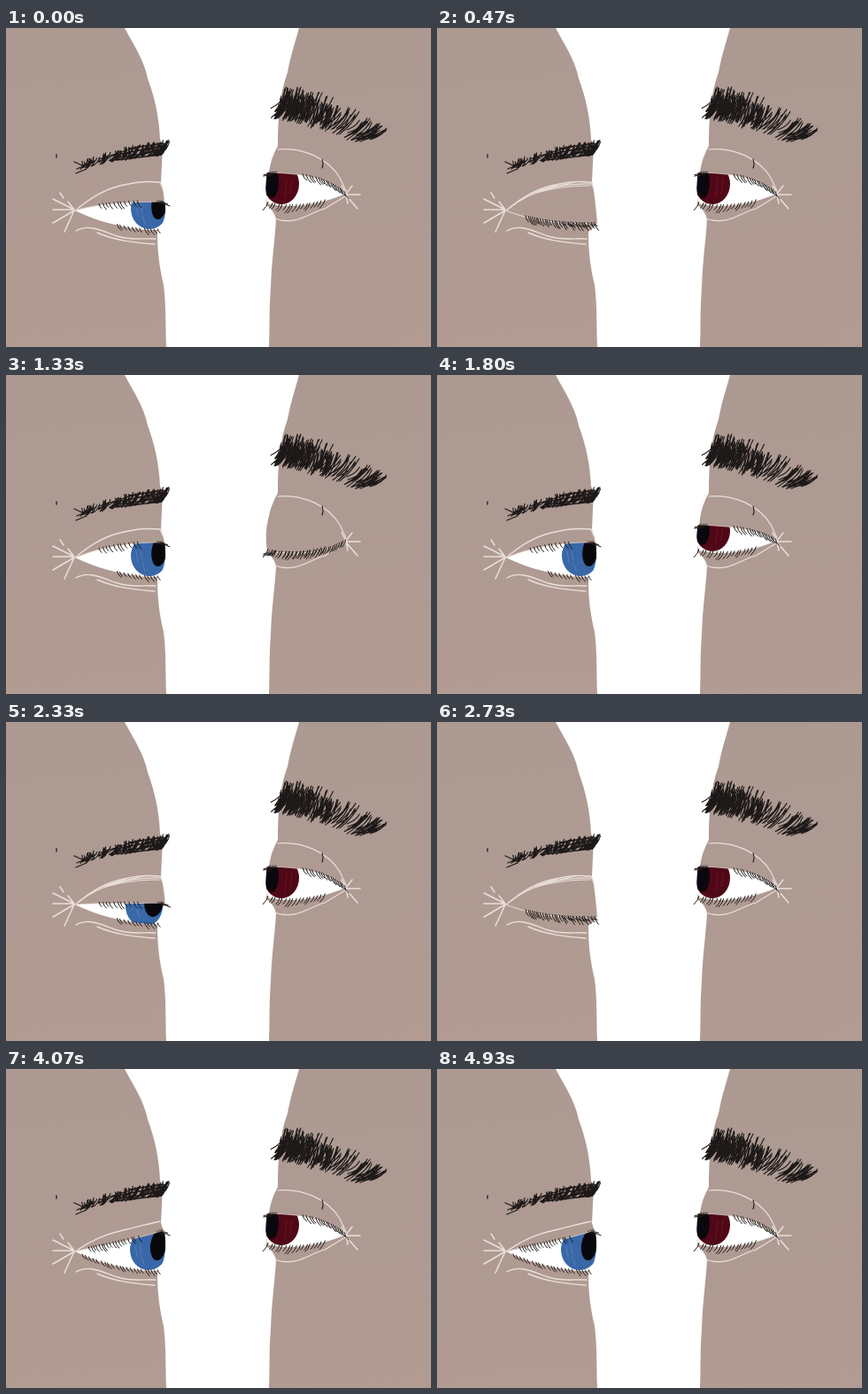
Animation of 480x360 px, one loop 5.39 s. Source, as an HTML page with a canvas:

```html
<!DOCTYPE html>
<html lang="en">
<head>
<meta charset="utf-8">
<title>Two eyes</title>
<style>
html, body { margin: 0; width: 100%; height: 100%; overflow: hidden; background: #fff; }
canvas { display: block; width: 480px; height: 360px; }
</style>
</head>
<body>
<canvas id="stage" width="480" height="360"></canvas>
<script>
const ctx = document.getElementById('stage').getContext('2d');
const LOOP = 5390, STEP = 1000 / 15;
const INK = '#1d1918', LINE = '#eadfd9';

// time, then heights of the two lid handles and the lid end
const leftLid = [
  [0, 199, 196, 196], [133, 207, 211, 209], [267, 215, 222, 221], [733, 215, 222, 221],
  [933, 204, 204, 204], [1200, 197, 188, 189], [2200, 197, 188, 189],
  [2333, 204, 205, 204], [2467, 215, 222, 221], [2800, 215, 222, 221],
  [3000, 204, 198, 197], [3267, 201, 194, 186], [3733, 200, 196, 182]
];
const rightLid = [
  [0, 172, 164, 163], [1000, 172, 164, 163], [1200, 197, 205, 199],
  [1467, 197, 205, 199], [1867, 172, 164, 163]
];
// time, then iris shift
const gaze = [[0, 1, 0], [1200, 1, 0], [2200, 1, 0], [2333, -5, 4], [2800, -3, 2], [3000, 1, 0], [3267, 0, 0]];

function sample(keys, time) {
  const next = keys.findIndex(k => k[0] > time);
  if (next < 0) return keys[keys.length - 1].slice(1);
  const a = keys[next - 1], b = keys[next];
  const u = (time - a[0]) / (b[0] - a[0]);
  return a.slice(1).map((v, i) => v + (b[i + 1] - v) * u);
}

function random(seed) {
  return () => (seed = (seed * 16807) % 2147483647) / 2147483647;
}

function stroke(path, color, width) {
  ctx.strokeStyle = color;
  ctx.lineWidth = width;
  ctx.stroke(new Path2D(path));
}

function fill(path, color) {
  ctx.fillStyle = color;
  ctx.fill(new Path2D(path));
}

function ellipse(x, y, rx, ry, color, tilt = 0) {
  ctx.beginPath();
  ctx.ellipse(x, y, rx, ry, tilt, 0, 7);
  ctx.fillStyle = color;
  ctx.fill();
}

function bezier(p, t) {
  const s = 1 - t;
  return [0, 1].map(i => s * s * s * p[i] + 3 * s * s * t * p[i + 2] + 3 * s * t * t * p[i + 4] + t * t * t * p[i + 6]);
}

const curve = p => `C${p.slice(2).join(' ')}`;

function lashes(p, from, to, count, dx, dy, seed) {
  const rnd = random(seed);
  let path = '';
  for (let i = 0; i < count; i++) {
    const [x, y] = bezier(p, from + (to - from) * (i + rnd() * .5) / count);
    const size = .7 + rnd() * .5;
    path += `M${x - dx * .2} ${y - dy * .2}q${dx * .2} ${dy * .6} ${dx * size} ${dy * size}`;
  }
  stroke(path, INK, 1);
}

function brow(top, bottom, count, slant, seed, bias) {
  const rnd = random(seed);
  let path = '';
  for (let i = 0; i < count; i++) {
    const t = Math.pow(rnd(), bias);
    const a = bezier(bottom, t), b = bezier(top, t);
    const low = rnd() * .35, high = .65 + rnd() * .4;
    const x1 = a[0] + (b[0] - a[0]) * low - slant * rnd(), y1 = a[1] + (b[1] - a[1]) * low;
    const x2 = a[0] + (b[0] - a[0]) * high + slant * rnd(), y2 = a[1] + (b[1] - a[1]) * high;
    path += `M${x1} ${y1}Q${(x1 + x2) / 2 + 3} ${(y1 + y2) / 2 + 2} ${x2} ${y2}`;
  }
  stroke(path, INK, 1.15);
}

function skinTone(x) {
  const g = ctx.createLinearGradient(x, 0, x + 40, 360);
  g.addColorStop(0, '#ac9a92');
  g.addColorStop(1, '#b19b93');
  return g;
}

function eyeball(lid, lower, back, iris) {
  const shape = `M${lid[0]} ${lid[1]}${curve(lid)}${back}${curve(lower)}Z`;
  fill(shape, '#fff');
  ctx.save();
  ctx.clip(new Path2D(shape));
  iris();
  ctx.restore();
}

function leftFace(time) {
  const [y1, y2, y3] = sample(leftLid, time);
  const [dx, dy] = sample(gaze, time);
  const shut = Math.max(0, (y3 - 196) / 25);
  const endX = 179 + shut * 2;
  const lid = [78, 206, 100, y1, 132, y2, endX, y3];
  const lower = [172, 228, 148, 229, 108, 221, 78, 206];
  const late = time > 2900;

  fill(`M0 0H134C144 19 156 36 160 57C168 78 173 101 174 126L177 131 175 174Q178 184 ${endX} ${y3}L171 230C171 252 173 269 178 290C181 312 180 337 181 360H0Z`, skinTone(0));
  if (y3 < 220) {
    eyeball(lid, lower, 'Q183 214 172 228', () => {
      ellipse(161 + dx, 204 + dy, 21, 23, '#3967a8');
      stroke(`M${146 + dx} 199l2 13M${153 + dx} 212l3 9M${151 + dx} 199l2 10`, '#5680b7', 1);
      ellipse(172 + dx, 199 + dy, 9 - dx * .35, 17, '#08080c', .12);
    });
  }

  stroke(late
    ? 'M78 206C96 194 110 187 132 182S162 174 174 172'
    : 'M78 206C93 194 108 183 129 178S160 173 174 174L177 181', LINE, 1.4);
  if (shut > .2) {
    stroke('M82 203C106 184 139 175 174 176M92 195C117 181 145 178 173 178M105 187L136 177M125 181L156 174', LINE, 1.1);
  }
  stroke('M79 229C94 220 110 230 126 235S153 237 169 238M103 231C124 240 143 242 168 244', LINE, 1.4);
  stroke('M77 205L53 193M77 205L53 205M77 206L53 220M77 206L66 230M77 205L70 196M61 186L65 192', LINE, 1.5);
  if (shut > .9) {
    stroke(`M78 206${curve(lid)}`, LINE, 1);
    lashes(lid, .3, 1, 28, 4, 8, 41);
    lashes(lid, .7, 1, 9, 7, 4, 17);
  } else {
    stroke(`M78 206${curve(lid)}`, '#d7c8c0', .8);
    lashes(lid, late ? .22 : .36, .8, late ? 18 : 11, 4, 7, 23);
    lashes(lid, .95, 1, 4, 9, 5, 9);
    lashes(lower, 0, late ? .94 : .55, late ? 22 : 12, 4, 6, 31);
  }

  brow([178, 127, 145, 130, 111, 139, 78, 151], [177, 145, 143, 149, 111, 151, 84, 162], 92, 8, 71, 1.8);
  stroke('M178 130L139 136M177 133L120 144M177 138L132 146M175 143L124 149M152 133L105 148M77 151L90 157M79 164L91 159M80 159L99 151M57 143V146', INK, 1.3);
}

function rightFace(time) {
  const [y1, y2, y3] = sample(rightLid, time);
  const shut = (y3 - 163) / 36;
  const lid = [384, 187, 365, y1, 345, y2, 295, y3];
  const lower = [295, 198, 323, 205, 355, 199, 384, 187];
  fill(`M480 0H331C326 18 322 29 318 50C309 74 307 102 307 133Q299 147 ${297 - shut} 163Q${296 - shut * 4} 180 ${295} ${y3}L294 200Q302 205 305 215C304 237 300 262 299 293C297 319 298 338 297 360H480Z`, skinTone(440));
  if (shut < .95) {
    eyeball(lid, lower, 'Q292 182 295 198', () => {
      ellipse(311, 176, 20, 23, '#500817');
      stroke('M317 171l-2 20M323 170l-2 16', '#6b1422', 1);
      ellipse(300, 174, 8, 18, '#0a080e');
    });
  }

  stroke('M307 137C334 134 364 147 377 169L384 184M303 215C329 224 342 208 360 204L383 190', LINE, 1.2);
  stroke('M384 187L391 178M385 188L400 188M385 190L397 204M383 185L379 178M384 187L386 198', LINE, 1.5);
  stroke('M357 148Q359 153 357 158', INK, 1.1);
  if (shut > .95) {
    stroke(`M384 187${curve(lid)}`, LINE, 1);
    lashes(lid, .02, .96, 25, -4, 8, 51);
  } else {
    stroke(`M384 187${curve(lid)}`, '#d7c8c0', .8);
    lashes(lid, .02, .7, 17, 5, 8, 51);
  }
  lashes(lid, .94, 1, 4, -10, 5, 12);
  lashes(lower, 0, .75, 17, -5, 8, 83);

  const top = [310, 68, 335, 62, 381, 88, 428, 114];
  const bottom = [305, 102, 336, 106, 366, 125, 411, 129];
  brow(top, bottom, 125, 9, 127, 1.2);
  brow([308, 78, 320, 70, 340, 76, 367, 89], [304, 103, 322, 103, 345, 109, 367, 119], 65, 5, 53, 1);
}

function draw(now) {
  const time = Math.floor((now % LOOP + 5) / STEP) * STEP;
  ctx.fillStyle = '#fff';
  ctx.fillRect(0, 0, 480, 360);
  ctx.lineCap = ctx.lineJoin = 'round';
  leftFace(time);
  rightFace(time);
}

let start;
function tick(now) {
  start ??= now;
  draw(now - start);
  requestAnimationFrame(tick);
}
draw(0);
requestAnimationFrame(tick);
</script>
</body>
</html>
```
